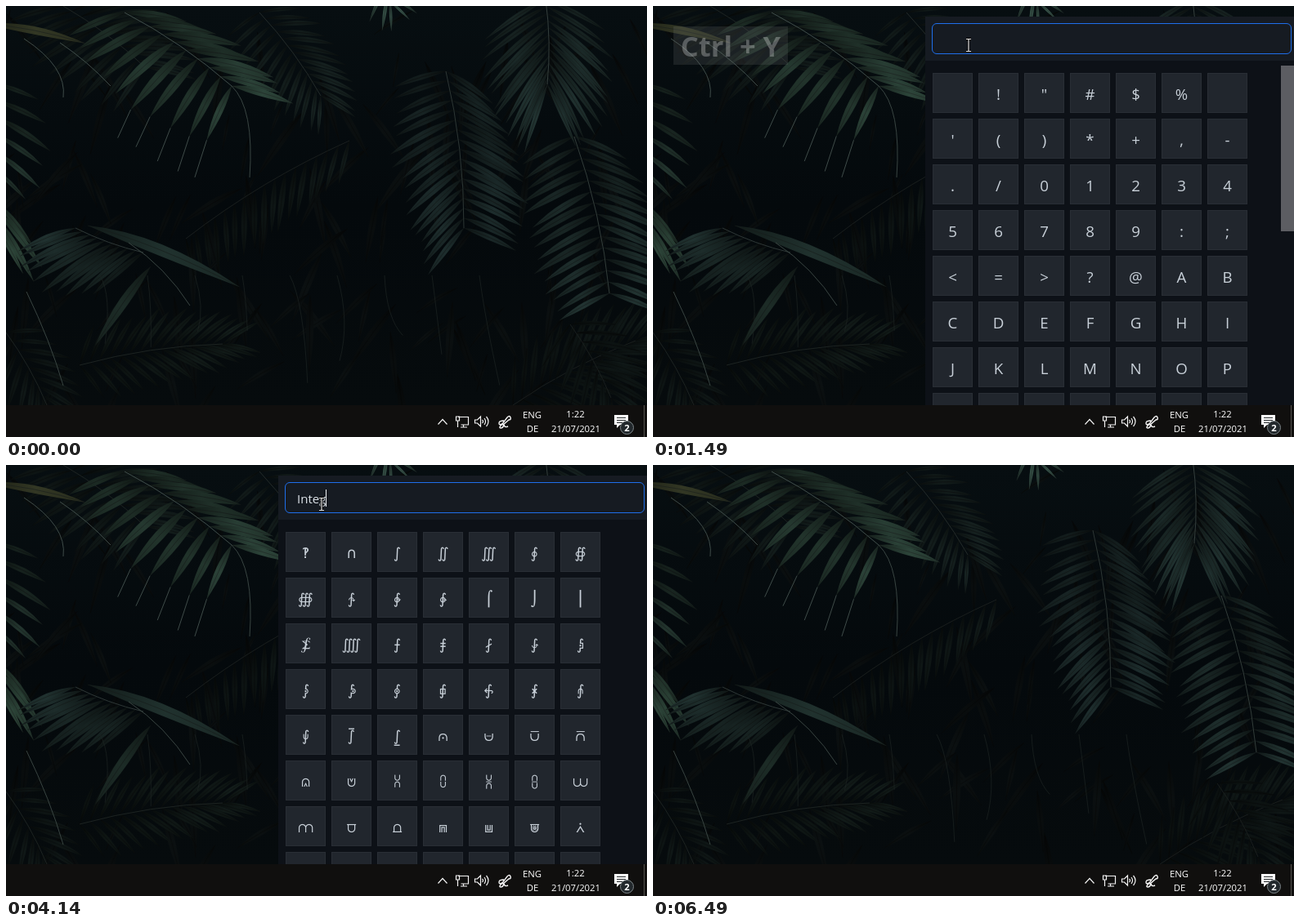
These frames come from a looping animation (784x528 px, 7880 ms). An HTML page with a canvas:

```html
<!DOCTYPE html>
<html lang="en">
<head>
<meta charset="utf-8">
<title>Character picker</title>
<style>
html, body { margin: 0; width: 100%; height: 100%; overflow: hidden; background: #04090c; }
body { font-family: "Open Sans", "Noto Sans", "DejaVu Sans", sans-serif; }
#stage { position: relative; width: 784px; height: 528px; overflow: hidden; }
#stage > *, #panel > *, .cell { position: absolute; box-sizing: border-box; }
#label { left: 25px; top: 25px; width: 140px; height: 47px; background: rgba(118,122,122,.5);
  color: #dedfdf; font: bold 34.5px/47px "Open Sans", sans-serif; text-align: center; white-space: nowrap; }
#panel { left: 333px; top: 13px; width: 451px; height: 476px; background: #0d1117; overflow: hidden; }
#head { left: 0; top: 0; width: 451px; height: 54px; background: #161b22; }
#field { left: 8px; top: 8px; width: 440px; height: 38px; border: 1px solid #30363d; border-radius: 6px; background: #0d1117; }
#field.focus { border-color: #1f6feb; background: #161b22; }
#query { left: 23px; top: 17px; height: 22px; font-size: 15px; line-height: 22px; color: #dce2e8; white-space: pre; }
#caret { display: inline-block; width: 1px; height: 21px; background: #f0f3f6; vertical-align: top; }
#thumb { left: 435px; top: 60px; width: 16px; height: 203px; background: #5c5d62; }
.cell { width: 49px; height: 49px; background: #21262d; border: 1px solid #292e35; color: #c9d1d9;
  font-size: 18.7px; line-height: 50px; text-align: center; white-space: pre; }
.math { font-family: "DejaVu Sans", "Noto Sans", sans-serif; font-size: 18px; }
.hot { background: #30363d; border-color: #3a4047; transform: translate(1.5px, 1.5px); }
#bar { left: 0; top: 489px; width: 784px; height: 39px; background: #100f0e; }
#bar text { font-size: 11.3px; fill: #fff; text-anchor: middle; }
#dot { width: 24px; height: 24px; margin: -13px; border-radius: 50%; background: #94941f; }
#mouse { left: 0; top: 0; overflow: visible; }
</style>
</head>
<body>
<div id="stage">
  <canvas id="wall" width="784" height="489"></canvas>
  <div id="label">Ctrl + Y</div>
  <div id="panel">
    <div id="head"></div>
    <div id="field"></div>
    <div id="query"><span id="typed"></span><span id="caret"></span></div>
    <div id="grid"></div>
    <div id="thumb"></div>
  </div>
  <svg id="bar" viewBox="0 489 784 39">
    <g fill="none" stroke="#f4f4f4" stroke-width="1.2">
      <path d="M528.5 512.5l5.500-6 5.500 6"/>
      <path d="M553 503.500h12.500v9.500h-9M559.500 513v3M556 516h8M550.500 503v5h4v-5zM552.500 508v8"/>
      <path d="M573.500 507h3l4-4v12l-4-4h-3zM582.500 507q2 2 0 4M585 505q3 4 0 8M587.500 503q5 6 0 12"/>
      <path d="M607 512l6-8q3-3 4 0t-2 3l-7 6zM609 508q-6 0-6 3t4 1q-5 5-2 5t4-4q1 4 5 2" stroke-width="1.4"/>
    </g>
    <text x="643.5" y="505">ENG</text><text x="644" y="522">DE</text>
    <text x="696.5" y="504">1:22</text><text x="697" y="522">21/07/2021</text>
    <path d="M744 501h17v12h-10l-4 4v-4h-3z" fill="#fff"/>
    <path d="M747 504.5h11M747 507.5h11M747 510.5h7" stroke="#24282a"/>
    <circle cx="759.5" cy="516.5" r="8" fill="#22282c" stroke="#7d8588"/>
    <text x="759.5" y="520.5" font-weight="bold">2</text>
    <path d="M780.5 489v39" stroke="#55534f"/>
  </svg>
  <div id="dot"></div>
  <svg id="mouse" width="1" height="1">
    <defs><path id="bar-i" d="M-3-7.5H3M0-7V7M-3 7.5H3"/></defs>
    <path id="arrow" d="M0 0V16.5L3.8 13 6.2 18.5 8.800 17.400 6.500 12H11.700Z" fill="#fff" stroke="#111" stroke-width=".8"/>
    <g id="beam" fill="none">
      <use href="#bar-i" stroke="#000" stroke-width="3"/>
      <use href="#bar-i" stroke="#e8e8e8" stroke-width="1.2"/>
    </g>
  </svg>
</div>
<script>
const $ = id => document.getElementById(id);
const LOOP = 7880;
const mix = (a, b, k) => a + (b - a) * k;
const clamp = v => Math.min(1, Math.max(0, v));

// Wallpaper: palm leaves in the dark
const ctx = $('wall').getContext('2d');
let seed = 11;
const rnd = () => (seed = seed * 16807 % 2147483647) / 2147483647;
const vary = (v, part) => v * (1 + (rnd() - .5) * part);
const tone = (hue, light, sat = 21) => `hsl(${hue} ${sat}% ${light}%)`;
const RAD = Math.PI / 180;

function line(d, light, width = .9) {
  ctx.strokeStyle = tone(165, light, 9);
  ctx.lineWidth = width;
  ctx.stroke(new Path2D(d));
}

// A drooping blade; returns its tip
function leaf(x, y, deg, len, light, { hue = 174, fat = .1 } = {}) {
  const dx = Math.cos(deg * RAD) * len, dy = Math.sin(deg * RAD) * len;
  const mx = x + dx * .45, my = y + dy * .45 - len * .06;
  const tip = [x + dx, y + dy];
  const shade = ctx.createLinearGradient(x, y, ...tip);
  [.55, 1, .8].forEach((v, i) => shade.addColorStop(i / 2, tone(hue, light * v)));
  ctx.fillStyle = shade;
  ctx.beginPath();
  ctx.moveTo(x, y);
  ctx.quadraticCurveTo(mx - dy * fat, my + dx * fat, ...tip);
  ctx.quadraticCurveTo(mx + dy * fat, my - dx * fat, x, y);
  ctx.fill();
  line(`M${x} ${y}Q${mx} ${my} ${tip}`, light * .6, .6);
  return tip;
}

// Blades along a bowed stem; left and right give their spread at base and end
function frond(x, y, tx, ty, len, light, opt = {}) {
  const { left = [60, 22], right = [60, 22], gap = 13, dry = false } = opt;
  const w = tx - x, h = ty - y, dir = Math.atan2(h, w) / RAD;
  const cx = x + w / 2 + h * .06, cy = y + h / 2 - w * .06;
  const n = Math.max(3, Math.round(Math.hypot(w, h) / gap));
  for (let i = 0; i <= n; i++) {
    const k = i / n, q = 1 - k;
    const px = q * q * x + 2 * q * k * cx + k * k * tx;
    const py = q * q * y + 2 * q * k * cy + k * k * ty;
    [left, right].forEach((spread, side) => {
      if (!spread) return;
      const deg = dir + (side ? -1 : 1) * mix(...spread, k) + rnd() * 5 - 2.5;
      const size = vary(len * (.85 + .25 * Math.sin(k * Math.PI)), .14);
      const end = leaf(px, py, deg, size, vary(light * mix(.75, 1.1, k), .25), opt);
      if (dry && !side && k > .45) line(`M${end}l${vary(-14, .6)} ${vary(42, .4)}`, 30);
    });
  }
  line(`M${x} ${y}Q${cx} ${cy} ${tx} ${ty}`, light * 1.7);
}

function paintWall() {
  const night = ctx.createLinearGradient(0, 0, 0, 489);
  ['#070e11', '#04090c', '#060b0d'].forEach((c, i) => night.addColorStop(i / 2, c));
  ctx.fillStyle = night;
  ctx.fillRect(0, 0, 784, 489);
  for (let i = 0; i < 150; i++)
    leaf(rnd() * 784, rnd() * 470, 50 + rnd() * 100, 40 + rnd() * 60, 4 + rnd() * 1.5, { hue: 190 });

  // far
  frond(220, 285, 420, 165, 65, 7, { left: [111, 136], right: null, gap: 15 });
  frond(620, 489, 770, 410, 70, 7);
  frond(690, 390, 740, 480, 70, 7);
  frond(90, 440, 265, 414, 60, 8, { hue: 165 });
  frond(0, 400, 50, 489, 60, 8);
  frond(70, 0, 170, 75, 80, 8, { left: [125, 90] });
  frond(310, 8, 385, 110, 60, 10, { left: [90, 40], gap: 11 });

  // right
  frond(538, 80, 560, 272, 80, 12.5, { left: [79, 43], right: [50, 58], hue: 180, gap: 12 });
  frond(695, 160, 738, 352, 82, 14, { left: [73, 74], right: [55, 57], gap: 14 });
  frond(660, -8, 662, 96, 98, 14.5, { gap: 9, fat: .07 });
  frond(458, -30, 470, -5, 40, 24, { hue: 158 });

  // left
  frond(145, 8, 276, 98, 86, 18, { left: [125, 80], right: [28, 20], hue: 153, gap: 17, fat: .12, dry: true });
  frond(-14, 95, -14, 200, 66, 15, { left: null, right: [70, 45], hue: 158, gap: 22 });
  frond(-12, 240, -10, 272, 80, 22, { left: null, right: [38, 24], hue: 150 });
  frond(168, 302, 85, 272, 92, 13, { left: null, right: [62, 40], gap: 10 });
  leaf(100, 269, 22, 200, 16, { hue: 168, fat: .07 });
  leaf(177, 319, 125, 118, 14, { hue: 160 });
  leaf(-25, 22, 11, 124, 18, { hue: 75, fat: .08 });

  // dry stalks
  line('M22 40Q75 75 70 112M66 45Q100 68 128 98', 30);
  line('M276 98Q304 125 298 210M150 290Q195 320 225 367M25 350Q54 410 70 465', 27);
  for (let i = 0; i < 9; i++) {
    const x = 115 + i * 58;
    line(`M${x} 330q${vary(9, 2)} ${vary(40, 1)} ${vary(14, 2)} ${vary(100, .8)}`, 13, .7);
  }
}

// Character sets shown in the grid
const range = (a, b) => Array.from(
  { length: b.codePointAt() - a.codePointAt() + 1 }, (_, i) => String.fromCodePoint(a.codePointAt() + i));
const blanks = Array(7).fill('');
const integra = [...range('∫', '∳'), ...'⌠⌡⎮', ...range('⨋', '⨜')].filter(c => c !== '⨐');
const GRIDS = {
  all: range(' ', 'W').map(c => c === '&' ? '' : c),
  I: [...'Ii¡ªº¿ÌÍÎÏìíîï', ...range('Ĩ', 'ı'), ...'ƗƾǏǐȂȃȆȇȈȉȊȋȎȏȒȓȖȗɨɩɪʁʖʶΙ', ...blanks],
  In: [...('¡ ª º ¿ ƾ Ȃ ȃ Ȇ ȇ Ȋ ȋ Ȏ ȏ Ȓ ȓ Ȗ ȗ ʁ ʖ ʶ ~\u0311 ~\u032e ~\u032f ~\u033a ⁀ Ի ի ێ ' +
    '~\u0657 ~\u0302 ~\u064f ۮ ۯ ۿ ٻ ڊ ش ▯ ▯ ▯ ▯ ک ژ ◌\u0311 ७ · ⌣ ◌ ७')
    .replaceAll('~', '\u00a0').split(' '), ...blanks],
  Int: [...'‽∩', ...integra, ...range('⩀', '⩑'), ...blanks],
  Integra: integra,
  Integral: integra.filter(c => !range('⨑', '⨔').includes(c))
};

let shown = '';
function showGrid(name) {
  if (name === shown) return;
  shown = name;
  $('grid').replaceChildren(...GRIDS[name].map((c, i) => {
    const cell = document.createElement('div');
    cell.className = name.startsWith('Int') ? 'cell math' : 'cell';
    cell.style.left = 9 + i % 7 * 56 + 'px';
    cell.style.top = 69 + Math.floor(i / 7) * 56 + 'px';
    if (c && '▯७⌣ʶ'.includes(c)) cell.style.fontSize = '12px';
    cell.textContent = c;
    return cell;
  }));
}

const TYPING = [
  [0, '', 'all'], [2880, 'I', 'I'], [3210, 'In', 'In'], [3940, 'Int', 'Int'],
  [4140, 'Integ', 'Int'], [4540, 'Integra', 'Integra'], [4670, 'Integral', 'Integral']
];
const CARET_ON = [[0, 1330], [1690, 2220], [2750, 5200]];
const CLICKS = [[1690, 2020], [5700, 5960]];
const within = (t, [a, b]) => t >= a && t < b;
const show = (id, on) => { $(id).style.visibility = on ? 'inherit' : 'hidden'; };

const easeOut = k => 1 - (1 - k) ** 3;
const easeBoth = k => k * k * (3 - 2 * k);
const easeIn = k => k * k;
const MOVES = [
  { from: 880, to: 1540, x: 386, y: 48, ease: easeOut },
  { from: 5230, to: 5600, x: 382, y: 105, ease: easeBoth },
  { from: 6180, to: 6430, x: 536, y: 9, ease: easeIn }
];

function pointer(t) {
  let x = 7, y = 207;
  for (const m of MOVES) {
    const k = m.ease(clamp((t - m.from) / (m.to - m.from)));
    x = mix(x, m.x, k);
    y = mix(y, m.y, k);
  }
  return [Math.round(x), Math.round(y)];
}

function draw(t) {
  $('label').style.opacity = clamp((t - 440) / 140) * clamp((1620 - t) / 340);
  show('panel', within(t, [730, 5960]));

  const [, text, grid] = TYPING.findLast(s => s[0] <= t);
  showGrid(grid);
  $('typed').textContent = text;
  show('caret', CARET_ON.some(r => within(t, r)));
  show('thumb', t < 4140);
  $('field').classList.toggle('focus', t < 5700);
  $('grid').firstChild.classList.toggle('hot', t >= 5540);

  const [x, y] = pointer(t);
  const overField = t < 5960 && x > 341 && y > 21 && y < 59;
  $('mouse').style.transform = $('dot').style.transform = `translate(${x}px, ${y}px)`;
  show('dot', CLICKS.some(r => within(t, r)));
  show('mouse', within(t, [800, 6490]));
  show('beam', overField);
  show('arrow', !overField);
}

paintWall();
const start = performance.now();
function tick() {
  draw((performance.now() - start) % LOOP);
  requestAnimationFrame(tick);
}
tick();
</script>
</body>
</html>
```
